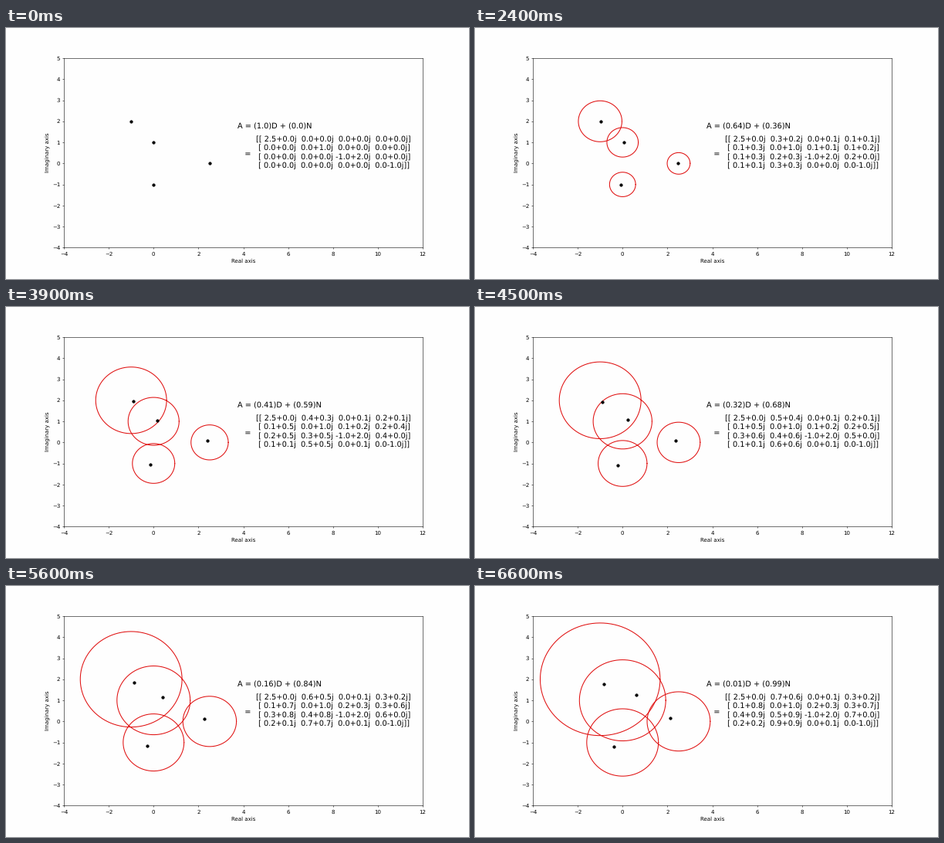
Recreate the animation shown at these times as a matplotlib script. Size 600 by 325 pixels, loop 6700 ms.

```python
from itertools import accumulate, repeat

import matplotlib.pyplot as plt
import numpy as np
from matplotlib.animation import FuncAnimation

plt.rcParams.update({
    "font.family": "DejaVu Sans",
    "font.size": 10,
    "text.hinting": "none",
    "axes.linewidth": 0.8,
    "lines.linewidth": 1.5,
})

FRAMES = 67
STEP = 0.015
BACKGROUND = "#fefefe"
RED = "#e01010"

# Diagonal part and the off-diagonal coupling that is blended in.
centers = np.array([2.5, 1j, -1 + 2j, -1j])
D = np.diag(centers)
N = np.array([
    [0, 0.722 + 0.578j, 0.02 + 0.145j, 0.30 + 0.18j],
    [0.146 + 0.80j, 0, 0.19 + 0.305j, 0.345 + 0.69j],
    [0.40 + 0.895j, 0.52 + 0.895j, 0, 0.685 + 0.02j],
    [0.21 + 0.175j, 0.875 + 0.88j, 0.01 + 0.10j, 0],
])
radii = np.abs(N).sum(axis=1)

# Summed step by step, so the rounded labels follow the running total.
weights = list(accumulate(repeat(STEP, FRAMES - 1), initial=0.0))
unit = np.exp(1j * np.linspace(0, 2 * np.pi, 200))


def matrix_text(matrix):
    rows = ["[" + " ".join(f"{z.real:4.1f}{z.imag:+.1f}j" for z in row) + "]"
            for row in matrix]
    return "[" + "\n ".join(rows) + "]"


fig = plt.figure(figsize=(12, 6.5), dpi=50, facecolor=BACKGROUND)
ax = fig.add_axes([0.125, 0.125, 0.775, 0.755], facecolor=BACKGROUND)
ax.set(xlim=(-4, 12), ylim=(-4, 5), xlabel="Real axis", ylabel="Imaginary axis")
ax.set_xticks(range(-4, 13, 2))
ax.set_yticks(range(-4, 6))

circles = [ax.plot([], [], color=RED)[0] for _ in centers]
dots, = ax.plot([], [], "ko", markersize=5)

formula = fig.text(0.5, 0.6, "", fontsize=14)
fig.text(0.5, 0.49, "   =", fontsize=14)
entries = fig.text(0.54, 0.444, "", fontsize=14)


def update(i):
    t = weights[i]
    A = D + t * N
    for line, center, radius in zip(circles, centers, radii):
        ring = center + t * radius * unit
        line.set_data(ring.real, ring.imag)
        line.set_visible(i > 0)
    eig = np.linalg.eigvals(A)
    dots.set_data(eig.real, eig.imag)
    formula.set_text(f"A = ({round(1 - t, 2)})D + ({round(t, 2)})N")
    entries.set_text(matrix_text(A))
    return [*circles, dots, formula, entries]


anim = FuncAnimation(fig, update, frames=FRAMES, interval=100,
                     repeat=True, repeat_delay=0, blit=False)
plt.show()
```
